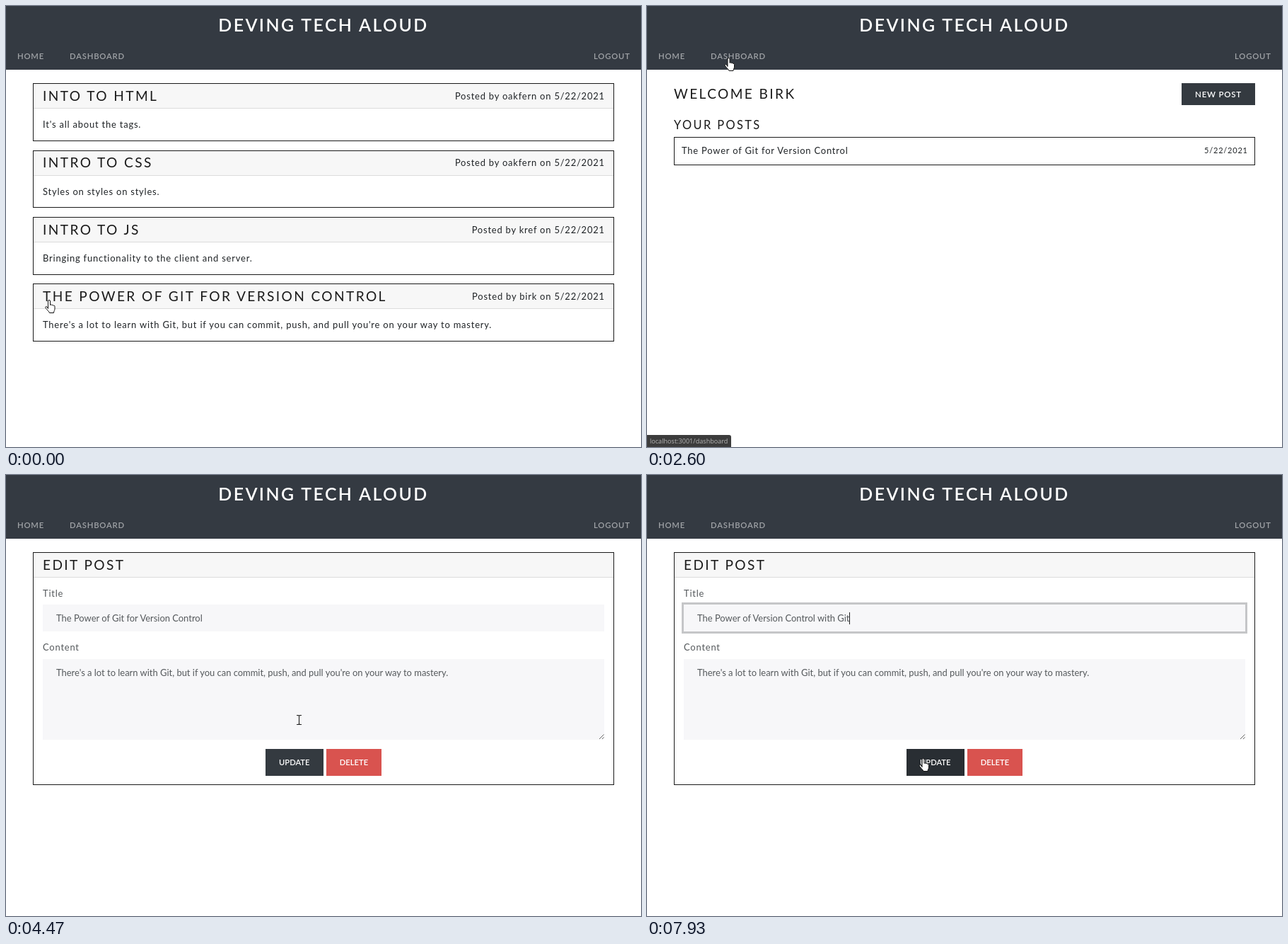
Recreate the animation shown at these times as an HTML page. Size 898 by 623 pixels, loop 8000 ms.

```html
<!DOCTYPE html>
<html lang="en">
<head>
<meta charset="utf-8">
<title>Deving Tech Aloud</title>
<style>
html, body { margin: 0; width: 100%; height: 100%; overflow: hidden; background: #fff; }
#stage { position: relative; width: 898px; height: 623px; overflow: hidden;
  font: 400 12.94px Lato, "Open Sans", sans-serif; color: #1f2326; }
#stage div, #stage .t { position: absolute; box-sizing: border-box; }
.t { white-space: pre; line-height: 20px; margin-top: -10px; letter-spacing: .8px; }
.brand { left: 0; width: 100%; text-align: center; color: #fff; font-size: 24.9px; font-weight: 600; letter-spacing: 2.4px; }
.nav { color: #a0a3a7; font-size: 11.3px; font-weight: 600; }
.nav.hover { color: #cccdd0; }
.head { color: #1a1a1a; font-size: 19.1px; letter-spacing: 2.4px; }
.sub { color: #1a1a1a; font-size: 16.4px; letter-spacing: 2.4px; }
.small { font-size: 11px; }
.label, .field { color: #55595c; }
.field { letter-spacing: 0; }
.btn { background: #343a40; color: #fff; font-size: 11.5px; font-weight: 600; letter-spacing: .8px; text-align: center; }
.tight { font-size: 11.2px; letter-spacing: 0; }
.btn.hover { background: #292e33; }
#stage .delete { background: #d9534f; }
.bar { left: 0; top: 0; width: 100%; height: 35px; background: #f7f7f7; border-bottom: 1px solid #dcdcdc; }
.card { border: 1px solid #1a1a1a; }
.card.hover { background: #eee; }
.input { background: #f7f7f9; }
.focus { box-shadow: 0 0 0 3px #c5c6c8; }
#title { display: flex; line-height: 17px; margin-top: -8.5px; }
#sel { background: #3390ff; color: #fff; }
#caret { width: 1px; height: 17px; margin-right: -1px; background: #222; }
#status { left: 0; bottom: 0; height: 17px; padding: 0 5px 0 4px; border-radius: 0 3px 0 0; white-space: pre;
  background: #3c3c3c; color: #b4b4b4; font: 9.1px/17px "Open Sans", sans-serif; }
svg { position: absolute; left: 0; top: 0; overflow: visible; }
</style>
</head>
<body>
<div id="stage"></div>
<script>
const LOOP = 8000, FPS = 15;
const OLD = "The Power of Git for Version Control";
const NEW = "The Power of Version Control with Git";
const BODY = "There's a lot to learn with Git, but if you can commit, push, and pull you're on your way to mastery.";

const text = (x, y, cls, s, id = "") =>
  `<span id="${id}" class="t ${cls}" style="left:${x}px;top:${y}px">${s}</span>`;
const textEnd = (x, y, cls, s) =>
  `<span class="t ${cls}" style="right:${898 - x}px;top:${y}px">${s}</span>`;
const box = (x, y, w, h, cls, inner = "", id = "") =>
  `<div id="${id}" class="${cls}" style="left:${x}px;top:${y}px;width:${w}px;height:${h}px;line-height:${h}px">${inner}</div>`;
const card = (y, h, inner = "", id = "") => box(38.4, y, 821.2, h, "card", inner, id);
const bar = '<div class="bar"></div>';

const posts = [
  ["INTO TO HTML", "oakfern", "It's all about the tags."],
  ["INTRO TO CSS", "oakfern", "Styles on styles on styles."],
  ["INTRO TO JS", "kref", "Bringing functionality to the client and server."],
  [OLD.toUpperCase(), "birk", BODY]
];
const postCard = ([title, user, body], i) => {
  const y = 109.2 + 94.4 * i;
  return card(y, 81.6, bar) + text(52, y + 17.6, "head", title) +
    textEnd(846.8, y + 17.6, "", `Posted by ${user} on 5/22/2021`) + text(52, y + 58, "", body);
};

const $ = id => document.getElementById(id);
$("stage").innerHTML =
  box(0, 0, 898, 90, "", "", "top") +
  text(0, 26.4, "brand", "DEVING TECH ALOUD") +
  text(16, 71.2, "nav", "HOME") + text(90, 71.2, "nav", "DASHBOARD", "dashLink") +
  textEnd(882.8, 71.2, "nav", "LOGOUT") +
  `<section id="home">${posts.map(postCard).join("")}</section>` +
  `<section id="dash">` +
    text(38, 124.3, "head", "WELCOME BIRK") + box(756, 109, 104, 31, "btn", "NEW POST") +
    text(38, 168.3, "sub", "YOUR POSTS") +
    card(185, 39.6, "", "row") + text(49, 204.3, "", OLD) + textEnd(849.8, 204, "small", "5/22/2021") +
  `</section>` +
  `<section id="edit">` +
    card(109.2, 328.8, bar) + text(52, 126.8, "head", "EDIT POST") +
    text(52, 167.2, "label", "Title") + box(52, 183.3, 794, 37.8, "input", "", "titleBox") +
    text(71, 202.3, "field", '<span id="plain"></span><span id="sel"></span><span id="caret"></span>', "title") +
    text(52, 243.3, "label", "Content") + box(52, 260, 794, 114, "input") + text(71, 278.5, "field", BODY) +
    '<svg width="1" height="1"><path d="M839 373L845.5 366.5M843 373L845.5 370.5" stroke="#666" fill="none"/></svg>' +
    box(367, 387, 81.5, 37.6, "btn tight", "UPDATE", "update") + box(453, 387, 78, 37.6, "btn tight delete", "DELETE") +
  `</section>` +
  '<div id="status"></div>' +
  `<svg id="cursor" width="1" height="1" stroke-linejoin="round">
    <path id="hand" fill="#fff" stroke="#111" d="M-1.5 12.5V2a1.5 1.5 0 0 1 3 0V7.5a1.4 1.4 0 0 1 2.5.3a1.4 1.4 0 0 1 2.3.6a1.2 1.2 0 0 1 1.7 1.1V13c0 2-1.5 3-1.5 5.5H.5C0 16.5-3 14.5-5 11.5c-.8-1.4.8-2.5 1.8-1.6z"/>
    <path id="arrow" fill="#fff" stroke="#111" stroke-width=".9" d="M0 0V13.5L3 10.7L5 15.2L7 14.3L5 10H9.3z"/>
    <path id="beam" fill="none" stroke="#222" stroke-width="1.1" d="M-3.5-6.5H-1L0-5.7L1-6.5H3.5M0-5.7V5.7M-3.5 6.5H-1L0 5.7L1 6.5H3.5"/>
  </svg>`;
$("top").style.background = "#343a42";

const clamp = (v, lo, hi) => Math.max(lo, Math.min(hi, v));
const ramp = (t, a, b) => clamp((t - a) / (b - a), 0, 1);
const ease = p => p * p * (3 - 2 * p);
const show = (id, on) => { $(id).style.display = on ? "" : "none"; };

// Pointer strokes: start, end, x, y
const strokes = [
  [70, 130, 38, 412], [270, 1070, 457, 417], [1130, 1270, 432, 423], [1625, 2130, 115.5, 73],
  [2870, 3200, 150, 191], [3400, 3730, 173, 201.5], [4270, 4465, 414.5, 346], [4600, 5070, 279, 200],
  [5130, 5825, 39, 210], [6330, 7070, 309, 298], [7330, 7900, 390.5, 400]
];
const pointerAt = t => strokes.reduce(([px, py], [a, b, x, y]) => {
  const p = ease(ramp(t, a, b));
  return [px + (x - px) * p, py + (y - py) * p];
}, [61, 415]);

function drawTitle(t, x) {
  const typed = clamp(Math.floor((t - 6430) / 40), 0, NEW.length);
  const focused = t >= 5120, charWidth = 5.69;
  const from = !focused ? OLD.length : clamp(Math.round((x - 71) / charWidth), 0, OLD.length);
  $("plain").textContent = typed ? NEW.slice(0, typed) : OLD.slice(0, t > 5900 ? 0 : from);
  $("sel").textContent = typed ? "" : OLD.slice(t > 5900 ? 0 : from);
  show("caret", typed > 0);
  $("titleBox").classList.toggle("focus", focused);
}

function draw(t) {
  const view = t < 2590 ? "home" : t < 3860 ? "dash" : "edit";
  const [x, y] = pointerAt(t);
  const over = (l, top, r, bottom) => x >= l && x < r && y >= top && y < bottom;

  const onNav = over(90, 64, 169, 84);
  const onUpdate = view === "edit" && over(367, 387, 449, 425);
  const onPost = view === "home" && over(52, 398, 541, 426) || view === "dash" && over(49, 196, 282, 214);
  const onField = view === "edit" && (over(52, 183, 846, 221) || over(52, 260, 846, 374));
  const shape = onNav || onUpdate || onPost ? "hand" : onField ? "beam" : "arrow";

  for (const id of ["home", "dash", "edit"]) show(id, id === view);
  for (const id of ["hand", "arrow", "beam"]) show(id, id === shape);
  $("cursor").style.transform = `translate(${x}px,${y}px)`;
  $("dashLink").classList.toggle("hover", onNav && view === "home");
  $("row").classList.toggle("hover", over(38, 185, 860, 225));
  $("update").classList.toggle("hover", onUpdate);

  const link = t < 2060 ? "post/4" : t < 3300 ? "dashboard" : "dashboard/edit-post/4";
  $("status").textContent = "localhost:3001/" + link;
  $("status").style.opacity = ramp(t, 330, 530) - ramp(t, 2930, 3130) + ramp(t, 3400, 3730) - ramp(t, 4230, 4400);
  drawTitle(t, x);
}

const start = performance.now();
function tick() {
  const t = (performance.now() - start) % LOOP;
  draw(Math.floor((t + 5) * FPS / 1000) * 1000 / FPS % LOOP);
  requestAnimationFrame(tick);
}
tick();
</script>
</body>
</html>
```
